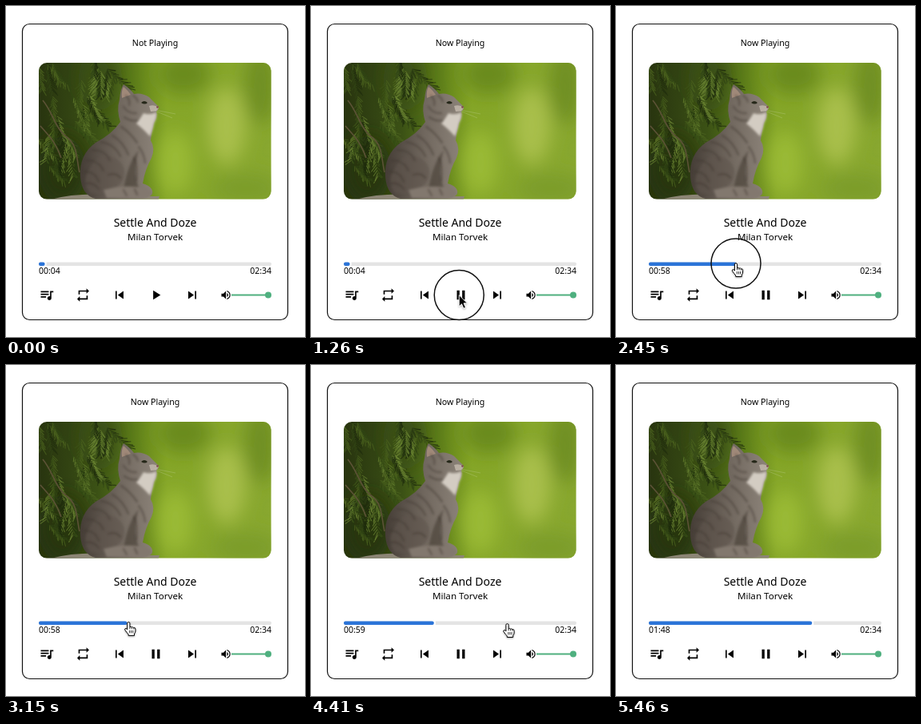
Write an HTML page that moves like this. It is 374 by 414 pixels and loops after 5.53 s.

```html
<!DOCTYPE html>
<html lang="en">
<head>
<meta charset="utf-8">
<title>Music player</title>
<style>
  html, body { margin: 0; width: 100%; height: 100%; overflow: hidden; background: #fff; }
  svg { display: block; width: 374px; height: 414px; font-family: "Noto Sans", "Open Sans", sans-serif; }
  .mid { text-anchor: middle; }
  .small { font-size: 10.5px; font-weight: 500; }
  .fur { fill: none; stroke: #3b332c; stroke-width: 2.2; stroke-linecap: round; opacity: .45; }
</style>
</head>
<body>
<svg viewBox="0 0 374 414">
  <defs>
    <clipPath id="round"><rect x="41" y="71" width="290.6" height="170.6" rx="10"/></clipPath>
    <linearGradient id="meadow">
      <stop offset="0" stop-color="#28340f"/>
      <stop offset=".25" stop-color="#3b5115"/>
      <stop offset=".42" stop-color="#5f8019"/>
      <stop offset=".55" stop-color="#85a628"/>
      <stop offset="1" stop-color="#88a72f"/>
    </linearGradient>
    <linearGradient id="coat">
      <stop offset="0" stop-color="#453d36"/>
      <stop offset=".5" stop-color="#70675e"/>
      <stop offset="1" stop-color="#8d847a"/>
    </linearGradient>
    <filter id="haze" x="-60%" y="-60%" width="220%" height="220%"><feGaussianBlur stdDeviation="11"/></filter>
    <filter id="soft" x="-20%" y="-20%" width="140%" height="140%"><feGaussianBlur stdDeviation=".7"/></filter>
    <filter id="fuzz" x="-20%" y="-20%" width="140%" height="140%"><feGaussianBlur stdDeviation="1.4"/></filter>
    <filter id="shade" x="-50%" y="-50%" width="200%" height="200%">
      <feDropShadow dx="0" dy="1" stdDeviation=".8" flood-opacity=".35"/>
    </filter>
  </defs>

  <rect width="374" height="414" fill="#fff"/>
  <rect x="20.5" y="22.5" width="332" height="370" rx="9" fill="#fff" stroke="#111" stroke-width="1.2"/>
  <text id="status" class="mid" x="186.5" y="50" font-size="10.6" font-weight="500"></text>

  <g clip-path="url(#round)">
    <rect x="41" y="71" width="291" height="171" fill="url(#meadow)"/>
    <g filter="url(#haze)">
      <ellipse cx="222" cy="85" rx="34" ry="26" fill="#6b8b1c"/>
      <ellipse cx="318" cy="100" rx="20" ry="48" fill="#708f22"/>
      <ellipse cx="276" cy="150" rx="24" ry="48" fill="#a9bf4c"/>
      <ellipse cx="212" cy="196" rx="22" ry="40" fill="#9aba35"/>
      <ellipse cx="300" cy="228" rx="42" ry="18" fill="#7c9c2b"/>
      <ellipse cx="70" cy="205" rx="30" ry="42" fill="#28360f"/>
      <ellipse cx="118" cy="92" rx="20" ry="34" fill="#3a5016"/>
    </g>
    <g id="needles" filter="url(#soft)" stroke-linecap="round"></g>
    <path d="M46 118c12 14 16 36 30 46s12 28 16 44M43 150c10 12 18 18 26 40" fill="none" stroke="#5c5236" stroke-width="1.6" filter="url(#soft)"/>
    <path d="M56 242q30-8 70-6t66 2l-2 6H56z" fill="#8b8474" filter="url(#soft)"/>

    <g filter="url(#soft)">
      <path d="M142 117Q143 104 147 98Q156 104 160 110Q170 108 179 114L190 125Q192 129 188 132
               Q190 138 185 146Q182 158 181 168Q187 178 182 190Q174 204 171 222Q184 226 183 234
               Q180 242 160 241H112Q95 237 93 214Q91 186 112 171Q133 160 143 145Q138 130 142 117Z" fill="url(#coat)"/>
      <path d="M145 115Q144 106 147 101Q153 106 156 111Z" fill="#a08979"/>
      <path d="M172 134Q180 137 188 133Q189 139 185 147Q183 157 180 163Q171 153 163 147Q168 141 172 134Z" fill="#d3ccc2" filter="url(#fuzz)"/>
      <path d="M179 125Q186 123 191 127Q190 132 181 132Z" fill="#b9afa3"/>
      <path d="M169 121q4-4 8 0q-3 3-8 0z" fill="#252719"/>
      <circle cx="189.5" cy="126.5" r="1.4" fill="#82564e"/>
      <path d="M105 203Q115 182 137 190Q154 201 145 220Q130 237 105 234Q94 220 105 203Z" fill="#5e554d" opacity=".6" filter="url(#fuzz)"/>
      <path d="M146 238Q150 200 166 180Q158 205 166 228Z" fill="#3f372f" opacity=".55" filter="url(#fuzz)"/>
      <path d="M122 230Q153 222 178 229Q188 236 174 240H126Z" fill="#82786e" filter="url(#fuzz)"/>
      <path class="fur" filter="url(#fuzz)" d="M150 112q6 6 4 12M159 112q5 3 6 8M147 126q6 9 16 8M148 139q9 6 16 4
        M144 151q10 6 20 20M133 162q13 7 20 24M119 170q17 3 24 18M108 180q16 0 22 13M101 193q15 0 21 13
        M98 207q14 0 18 13M99 222q11-2 17 7M166 176q7 9 8 20M160 190q5 10 3 28M128 211q10-3 15 4M147 230l4 7M161 229l3 7"/>
      <path d="M186 130l26 5M186 131l22 9" fill="none" stroke="#e6e8cf" stroke-width=".4" opacity=".5"/>
    </g>
  </g>

  <text class="mid" x="186.5" y="275.5" font-size="14">Settle And Doze</text>
  <text class="mid" x="186.5" y="293" font-size="11.6">Milan Torvek</text>

  <rect x="41" y="320.5" width="291" height="4.6" rx="2.3" fill="#e4e4e4"/>
  <rect id="gap" x="46" y="320" width="5" height="5.6" fill="#fff"/>
  <rect id="bar" x="41" y="320.5" height="4.6" rx="2" fill="#2b74d8"/>
  <text id="clock" class="small" x="41" y="334.6"></text>
  <text class="small" x="332" y="334.6" text-anchor="end">02:34</text>

  <g id="icons">
    <path transform="translate(41 351.5) scale(.83)" d="M15 6H3v2h12V6zm0 4H3v2h12v-2zM3 16h8v-2H3v2zM17 6v8.18c-.31-.11-.65-.18-1-.18-1.66 0-3 1.34-3 3s1.34 3 3 3 3-1.34 3-3V8h3V6h-5z"/>
    <path transform="translate(86.5 351.5) scale(.83)" d="M7 7h10v3l4-4-4-4v3H5v6h2V7zm10 10H7v-3l-4 4 4 4v-3h12v-6h-2v4z"/>
    <path transform="translate(132 351.5) scale(.83)" d="M6 6h2v12H6zm3.5 6l8.5 6V6z"/>
    <path id="toggle" transform="translate(177.5 351.5) scale(.83)"/>
    <path transform="translate(223 351.5) scale(.83)" d="M6 18l8.5-6L6 6v12zM16 6v12h2V6h-2z"/>
    <path transform="translate(267.6 354) scale(.625)" d="M3 9v6h4l5 5V4L7 9H3zm13.5 3c0-1.77-1.02-3.29-2.5-4.03v8.05c1.48-.73 2.5-2.25 2.5-4.02zM14 3.23v2.06c2.89.86 5 3.54 5 6.71s-2.11 5.85-5 6.71v2.06c4.01-.91 7-4.49 7-8.77s-2.99-7.86-7-8.77z"/>
  </g>
  <path d="M282 361.5h46" stroke="#4fb07f" stroke-width="2"/>
  <circle cx="328" cy="361.5" r="4" fill="#4fb07f"/>

  <g id="cursor">
    <circle id="ring" fill="none" stroke="#111" stroke-width="1.5"/>
    <path id="arrow" filter="url(#shade)" d="M0 0V14.2L3.3 11.1 5.7 16.6 8.2 15.5 5.8 10.2H10.2Z" fill="#000" stroke="#fff" stroke-width=".9"/>
    <g id="hand" filter="url(#shade)" stroke="#000" stroke-linejoin="round">
      <path d="M-1.6 9V1.2Q-1.5-.4 0-.4T1.6 1.2V6Q2.8 4.8 4 6.2Q5.4 5.2 6.4 6.8Q8.4 6.2 8.6 8.2V11Q8.4 13 7.2 14.2V16.5H-.2V15Q-2.4 12.6-4.6 9.4Q-5 7.6-3.2 7.5Z" fill="#fff" stroke-width="1"/>
      <path d="M1.3 10v3.4M3.4 10v3.4M5.5 10v3.4M1.6 6v2.4M4 6.4v2M6.4 7v1.6" fill="none" stroke-width=".8"/>
    </g>
  </g>
</svg>
<script>
const LOOP = 5530, STEP = 70, LENGTH = 154;
const PLAY = "M8 5v14l11-7z";
const PAUSE = "M6 19h4V5H6v14zm8-14v14h4V5h-4z";
const byId = id => document.getElementById(id);
const set = (id, attrs) => {
  for (const name in attrs) byId(id).setAttribute(name, attrs[name]);
};
const show = (id, on) => { byId(id).style.display = on ? "" : "none"; };

// Pointer stops: time, x, y.
const stops = [
  [210, 214, 416], [630, 194.5, 357.5], [770, 188, 362.5], [1190, 188, 362.5],
  [1680, 138, 346.5], [2240, 150, 322], [3080, 150, 322], [3640, 227.5, 319.5],
  [4130, 245.5, 324], [4620, 245.5, 324], [5110, 238, 371], [5460, 234, 418]
];
// Click rings: start, end, radius.
const rings = [[840, 1190, 23], [1190, 1330, 31], [2310, 2380, 23], [2380, 2450, 27], [2450, 2520, 31]];

function pointerAt(t) {
  const next = stops.findIndex(stop => stop[0] > t);
  if (next < 1) return null;
  const a = stops[next - 1], b = stops[next];
  const u = (t - a[0]) / (b[0] - a[0]);
  const eased = u * u * (3 - 2 * u);
  return [1, 2].map(i => a[i] + (b[i] - a[i]) * eased);
}

function secondsAt(t) {
  if (t < 2310) return 4;
  const ticks = since => Math.max(0, Math.floor((t - since) / 252)) * 0.24;
  return t < 4480 ? 58 + ticks(2506) : 107.35 + ticks(4480);
}

function draw(t) {
  const playing = t >= 1190;
  byId("status").textContent = playing ? "Now Playing" : "Not Playing";
  set("toggle", { d: playing ? PAUSE : PLAY });

  const seconds = secondsAt(t);
  const width = 291 * seconds / LENGTH;
  set("bar", { width });
  set("gap", { x: 41 + width - 3 });
  const pad = n => String(Math.floor(n)).padStart(2, "0");
  byId("clock").textContent = pad(seconds / 60) + ":" + pad(seconds % 60);

  const pointer = pointerAt(t);
  show("cursor", pointer);
  if (!pointer) return;
  const [x, y] = pointer;
  const overBar = y >= 320.8 && y < 328;
  set("cursor", { transform: `translate(${x} ${y})` });
  show("hand", overBar);
  show("arrow", !overBar);
  const ring = rings.find(([start, end]) => t >= start && t < end);
  show("ring", ring);
  if (ring) set("ring", { r: ring[2] });
}

// Fir sprigs: needles fan out along many drooping twigs, paler to the right.
function growNeedles() {
  let seed = 17;
  const random = () => (seed = seed * 16807 % 2147483647) / 2147483647;
  const colors = ["#4c641f", "#3d5419", "#6a8432", "#1f2c0d", "#314515"];
  let marks = "";
  for (let twig = 0; twig < 34; twig++) {
    const x0 = 36 + random() * 100, y0 = 62 + random() * (170 - x0) * 1.2;
    const angle = 0.7 + random() * 1.2, reach = 22 + random() * 22;
    for (let n = 0; n < 24; n++) {
      const along = n / 24 * reach;
      const x = x0 + Math.cos(angle) * along, y = y0 + Math.sin(angle) * along;
      const lean = angle + (n % 2 ? 0.6 : -0.6) + (random() - 0.5) * 0.5;
      const size = 5 + random() * 5;
      marks += `<path d="M${x.toFixed(1)} ${y.toFixed(1)}l${(Math.cos(lean) * size).toFixed(1)} ${(Math.sin(lean) * size).toFixed(1)}"
        stroke="${colors[(twig + n % 2) % colors.length]}" stroke-width="1.1" opacity=".7"/>`;
    }
  }
  byId("needles").innerHTML = marks;
}

growNeedles();
const start = performance.now();
function tick() {
  const t = (performance.now() - start) % LOOP;
  draw(Math.floor(t / STEP) * STEP);
  requestAnimationFrame(tick);
}
tick();
</script>
</body>
</html>
```
